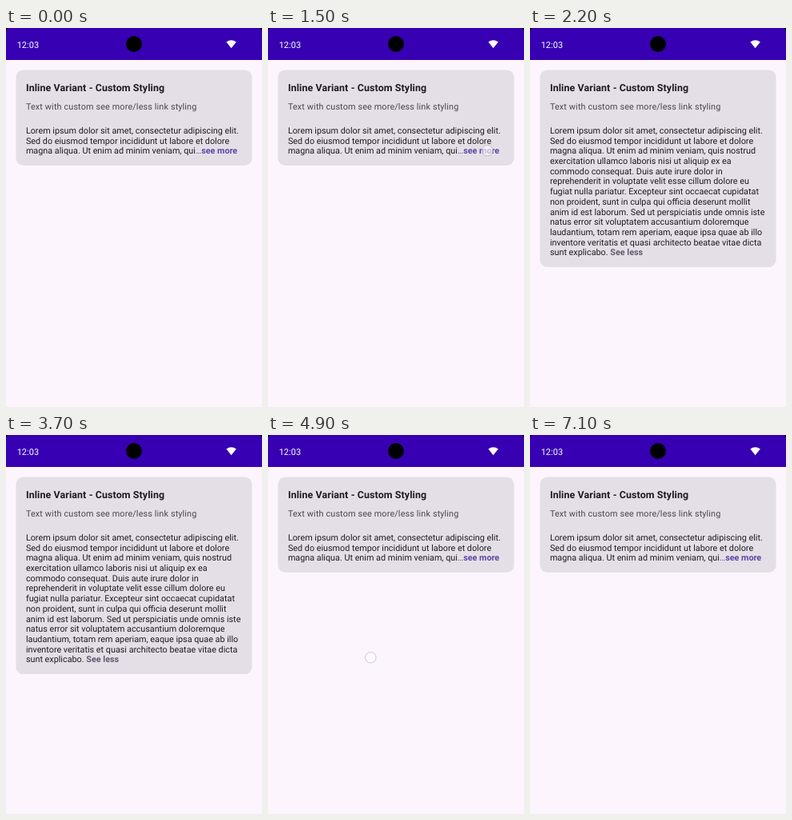
Recreate the animation shown at these times as an HTML page. Size 320x474 px, loop 7.2 s.

```html
<!DOCTYPE html>
<html lang="en">
<head>
<meta charset="utf-8">
<title>Inline Variant</title>
<style>
  html, body { margin: 0; width: 100%; height: 100%; overflow: hidden; background: #fcf5fd; }
  svg { display: block; width: 320px; height: 474px; }
  text { font: 10.8px Roboto, sans-serif; fill: #1d1b20; text-rendering: geometricPrecision; }
  .time { font-size: 11px; fill: #fff; }
  .title { font-size: 12.4px; font-weight: 700; letter-spacing: .117px; }
  .sub { fill: #49454f; letter-spacing: .15px; }
  .more { fill: #5f45a5; }
  .less { fill: #625b71; }
  .bold { font-weight: 700; }
  .card { fill: #e4dfe6; }
</style>
</head>
<body>
<svg viewBox="0 0 320 474">
  <clipPath id="clip"><rect id="window" width="320" height="474"/></clipPath>
  <rect width="320" height="40"/>
  <path d="M0 40V5Q0 0 5 0H315Q320 0 320 5V40Z" fill="#3700b3"/>
  <circle cx="160" cy="20" r="10"/>
  <text class="time" x="13.7" y="24.7">12:03</text>
  <path d="M275.4 17.6Q281.6 12.8 287.8 17.6L281.6 25.2Z" fill="#fff"/>
  <g clip-path="url(#clip)">
    <rect id="card" class="card" x="12.4" y="52.6" width="295.2" rx="9.3"/>
    <text class="title" x="24.9" y="79">Inline Variant - Custom Styling</text>
    <text class="sub" x="24.9" y="102">Text with custom see more/less link styling</text>
    <g id="short"></g>
    <g id="full"></g>
  </g>
  <circle id="tap" r="6.7" fill="#fff" fill-opacity=".6" stroke="#bdb8c4" stroke-width=".9"/>
</svg>
<script>
const LOOP = 7200, OPEN = 1549, CLOSE = 4880;
const TOP = 52.6, SHORT_END = 171.9, LINE = 12.72, FULL_END = SHORT_END + 10 * LINE;
const el = id => document.getElementById(id);

const lines = [
  'Lorem ipsum dolor sit amet, consectetur adipiscing elit.',
  'Sed do eiusmod tempor incididunt ut labore et dolore',
  'magna aliqua. Ut enim ad minim veniam, quis nostrud',
  'exercitation ullamco laboris nisi ut aliquip ex ea',
  'commodo consequat. Duis aute irure dolor in',
  'reprehenderit in voluptate velit esse cillum dolore eu',
  'fugiat nulla pariatur. Excepteur sint occaecat cupidatat',
  'non proident, sunt in culpa qui officia deserunt mollit',
  'anim id est laborum. Sed ut perspiciatis unde omnis iste',
  'natus error sit voluptatem accusantium doloremque',
  'laudantium, totam rem aperiam, eaque ipsa quae ab illo',
  'inventore veritatis et quasi architecto beatae vitae dicta',
  'sunt explicabo. <tspan class="less bold">See less</tspan>'
];
const cut = 'magna aliqua. Ut enim ad minim veniam, qui' +
  '<tspan class="more">…</tspan><tspan class="more bold">see more</tspan>';
const paragraph = rows => rows.map((row, i) =>
  `<text x="24.9" y="${131.8 + i * LINE}">${row}</text>`).join('');
el('full').innerHTML = paragraph(lines);
el('short').innerHTML = paragraph([...lines.slice(0, 2), cut]);

const taps = [
  { x: 274.3, y: 153.3, down: 1380, up: OPEN },
  { x: 128.3, y: 278.3, down: 4750, up: CLOSE }
];

function draw(t) {
  const open = t >= OPEN && t < CLOSE;
  const end = open ? FULL_END : SHORT_END;
  el('full').style.display = open ? '' : 'none';
  el('short').style.display = open ? 'none' : '';
  el('card').setAttribute('height', end - TOP);

  // Critically damped spring reveals the card; closing is immediate.
  const s = 0.0132 * (t - OPEN);
  const reveal = 1 - (1 + s) * Math.exp(-s);
  el('window').setAttribute('height',
    open && t < 2300 ? SHORT_END + (FULL_END - SHORT_END) * reveal : 474);

  const tap = taps.find(p => t >= p.down && t < p.up + 150);
  el('tap').style.opacity = tap ? Math.min(1, 1 - (t - tap.up) / 150) : 0;
  if (tap) {
    el('tap').setAttribute('cx', tap.x);
    el('tap').setAttribute('cy', tap.y);
  }
}

const start = performance.now();
function frame() {
  draw((performance.now() - start) % LOOP);
  requestAnimationFrame(frame);
}
frame();
</script>
</body>
</html>
```
